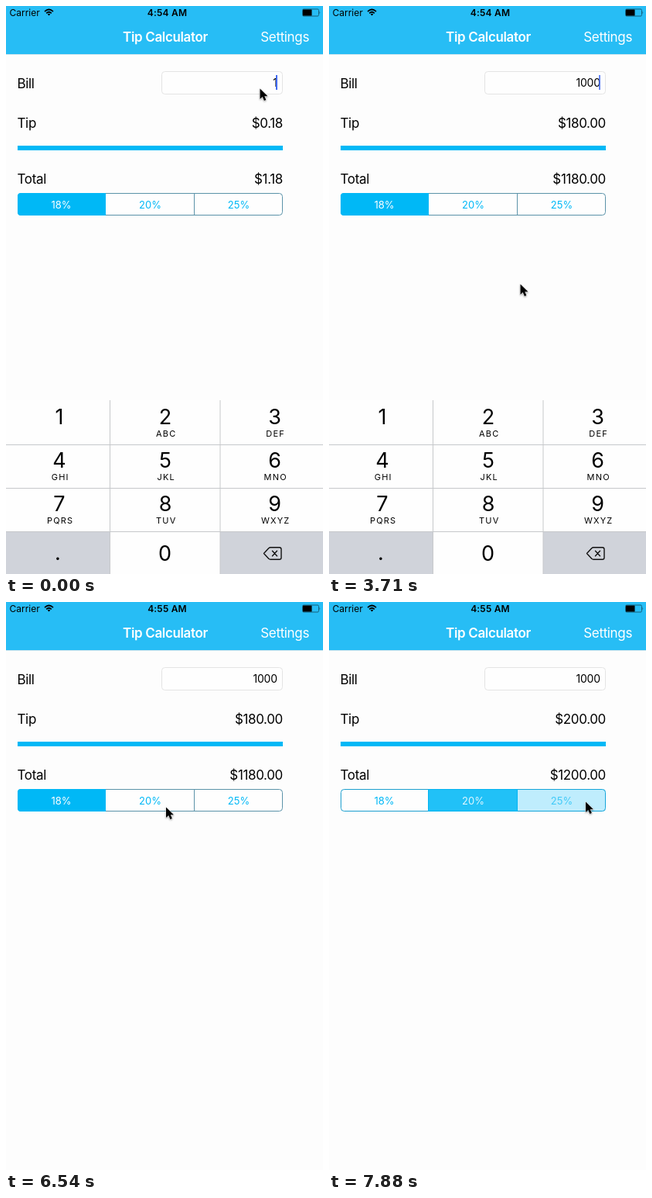
Animation, 410 px wide and 732 px high, one loop 8 s. Source, as an HTML page:

```html
<!DOCTYPE html>
<html lang="en">
<head>
<meta charset="utf-8">
<title>Tip Calculator</title>
<style>
  html, body { margin: 0; width: 100%; height: 100%; overflow: hidden; background: #fdfdfd; }
  svg { display: block; width: 100vw; height: 100vh; font-family: Inter, Roboto, sans-serif; }
  .body { font-size: 17px; letter-spacing: -.35px; }
  .end { text-anchor: end; }
  .mid { text-anchor: middle; }
  .status { font-size: 12px; }
  .bold { font-weight: 600; }
  .seg { font-size: 13px; }
  .digit { font-size: 27px; }
  .letters { font-size: 11px; letter-spacing: 1.2px; }
  #cursor { filter: drop-shadow(0 1px 1px rgba(0, 0, 0, .35)); }
</style>
</head>
<body>
<svg viewBox="0 0 410 732">
  <defs>
    <clipPath id="round"><rect x="15" y="241" width="343" height="29" rx="4"/></clipPath>
  </defs>
  <rect width="410" height="732" fill="#fdfdfd"/>

  <rect width="410" height="62" fill="#27bdf5"/>
  <rect y="62" width="410" height="1" fill="#d3e6ee"/>
  <text class="status" x="4.5" y="13">Carrier</text>
  <g fill="none" stroke="#000" stroke-width="1.7">
    <path d="M50 7.1Q55.5 1.9 61 7.1M52.2 9.3Q55.5 6.2 58.8 9.3"/>
    <path d="M53.7 10.4Q55.5 9 57.3 10.4L55.5 12.4Z" fill="#000" stroke="none"/>
  </g>
  <text class="status bold mid" id="clock" x="208.5" y="13" letter-spacing=".2"></text>
  <rect x="383.5" y="4" width="21" height="9" rx="1.5" fill="none" stroke="#15617d"/>
  <rect x="384" y="4.5" width="11.5" height="8" rx=".5"/>
  <path d="M405.5 6.8q1.6 1.7 0 3.4z" fill="#15617d"/>
  <g class="body" fill="#fff">
    <text class="bold mid" x="206" y="46.3">Tip Calculator</text>
    <text class="end" x="392" y="46.3">Settings</text>
  </g>

  <g class="body">
    <text x="14.5" y="106">Bill</text>
    <text x="14.5" y="157">Tip</text>
    <text x="14.5" y="229">Total</text>
    <text class="end" id="tip" x="358" y="157"></text>
    <text class="end" id="total" x="358" y="229"></text>
  </g>
  <rect x="201.5" y="84.5" width="156" height="29" rx="4" fill="#fefefe" stroke="#e4e4e4"/>
  <text class="end" id="bill" x="350.8" y="103.5" font-size="14" letter-spacing="-.2"></text>
  <rect id="caret" x="349" y="89" width="2" height="19" fill="#426bf2"/>
  <rect x="15" y="180" width="343" height="6" fill="#00b8f6"/>

  <g id="outline" fill="none">
    <rect x="15.5" y="241.5" width="342" height="28" rx="4" fill="#fefefe"/>
    <path d="M128.5 241v29M243.5 241v29"/>
  </g>
  <g id="fills" clip-path="url(#round)" fill="#00b8f6"></g>
  <g id="labels" class="seg mid"></g>

  <g id="keyboard">
    <rect y="508" width="410" height="224" fill="#fefefe"/>
    <path d="M0 678H135V732H0ZM277 678H410V732H277Z" fill="#d0d3da"/>
    <path d="M134.5 508V732M277 508V732M0 565.5H410M0 621.5H410M0 677.5H410" fill="none" stroke="#c6c8cb"/>
    <g id="keys" class="mid"></g>
    <g fill="none" stroke="#111" stroke-width="1.4" stroke-linejoin="round" stroke-linecap="round">
      <path d="M333.5 705.5L340 698.6Q340.8 697.7 342 697.7H353.5Q356 697.7 356 700V711Q356 713.3 353.5 713.3H342Q340.8 713.3 340 712.4Z"/>
      <path d="M344.5 702.3l6 6.4m0-6.4l-6 6.4"/>
    </g>
  </g>

  <path id="cursor" d="M.5 .5V14L3.7 11.1L5.9 16L8.4 14.9L6.3 10.2H10.5Z" stroke="#fff" stroke-width="1" stroke-linejoin="round" paint-order="stroke"/>
</svg>
<script>
  const LOOP = 8000, STEP = 148.6;
  const BLUE = [0, 184, 246];
  const $ = id => document.getElementById(id);

  function add(parent, tag, attrs, text = '') {
    const el = document.createElementNS('http://www.w3.org/2000/svg', tag);
    for (const name in attrs) el.setAttribute(name, attrs[name]);
    el.textContent = text;
    return $(parent).appendChild(el);
  }

  const columns = [69, 206, 347.5];
  ['', 'ABC', 'DEF', 'GHI', 'JKL', 'MNO', 'PQRS', 'TUV', 'WXYZ'].forEach((letters, i) => {
    const x = columns[i % 3], y = 538.5 + 56.3 * Math.floor(i / 3);
    add('keys', 'text', { class: 'digit', x, y }, i + 1);
    add('keys', 'text', { class: 'letters', x: x + 1.2, y: y + 16.3 }, letters);
  });
  add('keys', 'text', { class: 'digit', x: 205.5, y: 715 }, '0');
  add('keys', 'text', { class: 'digit', x: 67, y: 713.5 }, '.');

  const segments = [['18%', 15, 114, 71.5], ['20%', 128, 116, 186.5], ['25%', 243, 115, 301]]
    .map(([name, x, width, mid]) => ({
      fill: add('fills', 'rect', { x, y: 241, width, height: 29 }),
      label: add('labels', 'text', { x: mid, y: 260.5 }, name)
    }));

  // Each row starts with the step from which it holds.
  const bills = [[0, 1], [3, 10], [5, 100], [15, 1000]];
  const shades = [[0, 1, 0, 0], [45, 1, .25, 0], [46, .15, .9, 0], [47, 0, 1, 0], [53, 0, .87, .25]];
  const moves = [
    [0, 328, 106], [19, 316, 150], [20, 285, 260], [21, 252, 360], [22, 235, 397], [23, 247, 358],
    [29, 248, 345], [30, 253, 300], [31, 262, 235], [32, 273, 170], [33, 281, 135], [34, 285, 123],
    [35, 285, 132], [38, 256.5, 173], [39, 240, 195], [40, 226, 220], [41, 216, 240], [42, 210, 254],
    [43, 208, 262], [44, 206.5, 264], [48, 214, 264], [49, 240, 261], [50, 280, 258], [51, 315, 256],
    [52, 329, 257], [53, 331.5, 257]
  ];
  const at = (rows, n) => rows.filter(row => row[0] <= n).pop();
  const money = value => '$' + value.toFixed(2);

  function caretAlpha(n, typed) {
    const phase = (n - typed) % 7;
    return n >= 28 || phase > 3 ? 0 : phase === 3 ? .8 : 1;
  }

  function draw(n) {
    const [typed, bill] = at(bills, n);
    const tip = bill * (n < 46 ? .18 : .2);
    $('bill').textContent = bill;
    $('tip').textContent = money(tip);
    $('total').textContent = money(bill + tip);
    $('clock').textContent = n < 38 ? '4:54 AM' : '4:55 AM';
    $('caret').setAttribute('opacity', caretAlpha(n, typed));
    $('outline').setAttribute('stroke', n < 46 ? '#5b93a9' : '#1c9fcf');

    const [, ...alphas] = at(shades, n);
    segments.forEach(({ fill, label }, i) => {
      const a = alphas[i];
      fill.setAttribute('opacity', a);
      label.setAttribute('fill', `rgb(${BLUE.map(c => Math.round(c + (255 - c) * a))})`);
    });

    $('keyboard').setAttribute('transform', `translate(0 ${n < 28 ? 0 : n === 28 ? 222 : 240})`);
    const [, x, y] = at(moves, n);
    $('cursor').setAttribute('transform', `translate(${x} ${y})`);
  }

  let last = -1;
  function tick() {
    const n = Math.min(53, Math.floor((performance.now() % LOOP + 6) / STEP));
    if (n !== last) draw(last = n);
    requestAnimationFrame(tick);
  }
  tick();
</script>
</body>
</html>
```
